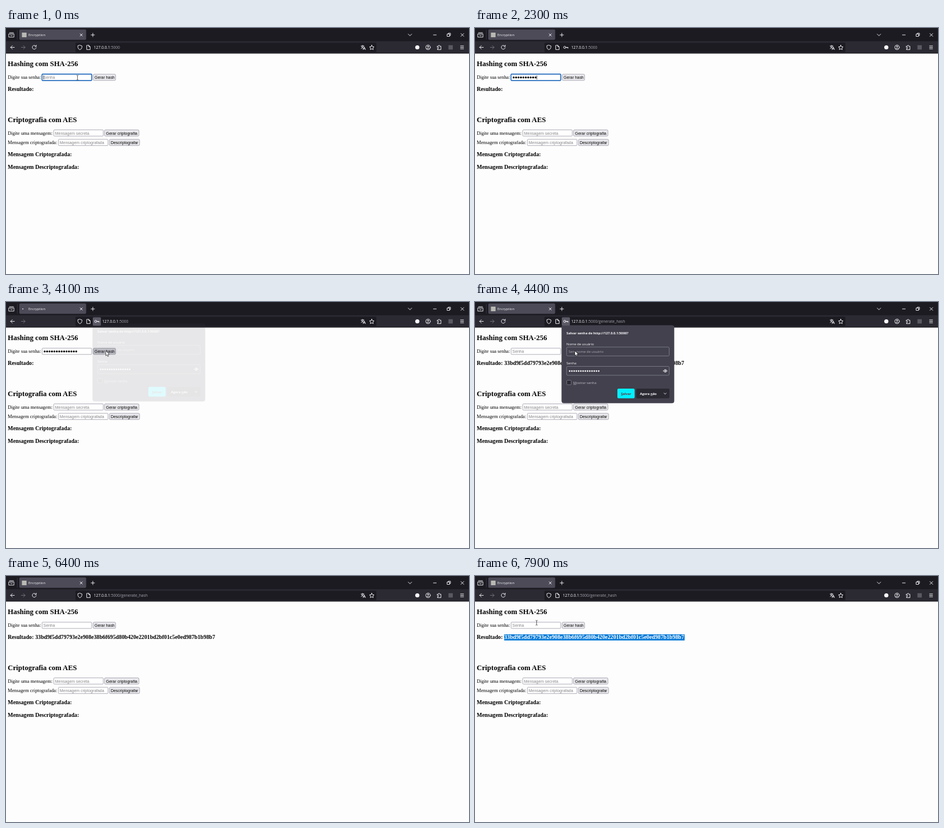
An HTML page that plays this animation: 800x426 px, repeating every 8 s.

```html
<!DOCTYPE html>
<html lang="pt">
<head>
<meta charset="utf-8">
<title>Encryption</title>
<style>
html, body { margin: 0; width: 100%; height: 100%; overflow: hidden; background: #fdfdfd; }
svg { display: block; width: 800px; height: 426px; }
text { white-space: pre; }
.page { font: 8.333px "Liberation Serif", serif; }
.page .h2 { font-size: 12.5px; font-weight: bold; }
.page .h3 { font-size: 9.75px; font-weight: bold; }
.page .form { font: 6.944px "Liberation Sans", sans-serif; }
.hint { fill: #858589; }
.field { fill: #fff; stroke: #8f8f9d; stroke-width: .7; }
.button { fill: #e9e9ed; stroke: #8f8f9d; stroke-width: .7; }
.ui { font: 5.9px "Open Sans", "Noto Sans", sans-serif; fill: #fbfbfe; }
.bold { font-weight: bold; font-size: 5.72px; }
.icon { fill: none; stroke: #fbfbfe; stroke-width: .9; stroke-linecap: round; stroke-linejoin: round; }
.dots { fill: none; stroke-linecap: round; }
.key { text-decoration: underline; }
</style>
</head>
<body>
<svg viewBox="0 0 800 426">
  <rect width="800" height="426" fill="#fdfdfd"/>

  <g class="page">
    <text class="h2" x="3" y="66">Hashing com SHA-256</text>
    <text x="3" y="88">Digite sua senha:</text>
    <text class="h3" x="3" y="109.4">Resultado:</text>
    <rect id="selection" x="50.4" y="101" width="311.8" height="10.6" fill="#0078d7"/>
    <text id="hash" class="h3" x="50.4" y="109.4">33bd9f5dd79793e2e908e38b6f695d80b420e2201bd2bf01c5e0ed987b1b98b7</text>
    <text class="h2" x="3" y="163">Criptografia com AES</text>
    <text x="3" y="184.6">Digite uma mensagem:</text>
    <text x="3" y="201">Mensagem criptografada:</text>
    <text class="h3" x="3" y="222.4">Mensagem Criptografada:</text>
    <text class="h3" x="3" y="243.6">Mensagem Descriptografada:</text>

    <g class="form">
      <rect class="field" x="62.4" y="80" width="85.6" height="10.8" rx="1"/>
      <rect id="focus" x="62.2" y="79.8" width="86" height="11.2" rx="1.2" fill="none" stroke="#1565c0" stroke-width="1.4"/>
      <text id="hint" class="hint" x="64.5" y="88">Senha</text>
      <path id="typed" class="dots" stroke="#000" stroke-width="3.3" stroke-dasharray="0 4.2"/>
      <path id="caret" stroke="#000" stroke-width=".7"/>
      <rect id="hashButton" class="button" x="150.6" y="80" width="38.8" height="10.8" rx="1.8"/>
      <text x="153" y="88">Gerar hash</text>
      <rect class="field" x="82.6" y="176.4" width="85.4" height="10.8" rx="1"/>
      <text class="hint" x="84.8" y="184.6">Mensagem secreta</text>
      <rect class="button" x="170.1" y="176.4" width="59.6" height="10.8" rx="1.8"/>
      <text x="172.8" y="184.6">Gerar criptografia</text>
      <rect class="field" x="90.6" y="192.8" width="85.6" height="10.8" rx="1"/>
      <text class="hint" x="92.8" y="201">Mensagem criptografada</text>
      <rect class="button" x="178.6" y="192.8" width="52.2" height="10.8" rx="1.8"/>
      <text x="181" y="201">Descriptografar</text>
    </g>
  </g>

  <g class="ui">
    <rect width="800" height="23" fill="#1c1b22"/>
    <rect y="23" width="800" height="21" fill="#2b2a33"/>
    <path d="M0 44H800" stroke="#0c0c0d" stroke-width=".6"/>
    <path d="M19.5 3V20" stroke="#42414d" stroke-width=".6"/>
    <rect x="23" y="2.5" width="115.5" height="18" rx="2" fill="#4c4b57"/>
    <rect id="favicon" x="27.5" y="8" width="8" height="8" fill="#b9b9b4"/>
    <circle id="loading" cy="12" r="1" fill="#d8d8de"/>
    <text x="38.8" y="14.1" font-size="5.85">Encryption</text>
    <rect x="120" y="25.5" width="520" height="16.5" rx="2" fill="#1c1b22"/>
    <rect id="keyBack" x="150" y="26.5" width="14" height="14.5" rx="1.5" fill="#5b5a66"/>

    <g class="icon">
      <path d="M6 8.2H13M5.2 10.2H13.8V15.8H5.2ZM7.7 12.4Q9.5 14.6 11.3 12.4"/>
      <path d="M128 10l4 4m0-4l-4 4M147 12h6M150 9v6"/>
      <path d="M695 10.5l3 3 3-3M738.5 12h5M762.5 10.5h4v4h-4zM764 10.5V9h4v4h-1.5M786 9.5l5 5m0-5l-5 5"/>
      <path d="M14.5 33.5H8M11 30.5l-3 3 3 3"/>
      <path d="M26.5 33.5H33M30 30.5l3 3-3 3" stroke="#77767f"/>
      <path id="reload" d="M51.6 31.4A3.4 3.4 0 1 0 52.2 34M52.3 29.7V32H50"/>
      <path d="M127.7 29.8L131.2 31V33.4Q131 36.2 127.7 37.7Q124.4 36.2 124.2 33.4V31Z"/>
      <path d="M139.8 30H143L145.4 32.4V37.4H139.8ZM143 30V32.4H145.4"/>
      <g id="keyIcon"><circle cx="155" cy="33.5" r="1.9"/><path d="M157 33.5H160.8V35M159 33.5V34.7"/></g>
      <path d="M613.5 31.2H618.5M616 30V31.2M617.6 31.2Q616.8 34 613.8 35.6M614.5 32.5Q615.6 34.4 617.2 35M617 37.5L619 32.8 621 37.5M617.8 36H620.3"/>
      <path d="M632 29.8L633.2 32.3 636 32.7 634 34.6 634.5 37.4 632 36.1 629.5 37.4 630 34.6 628 32.7 630.8 32.3Z"/>
      <circle cx="729.3" cy="33.5" r="4"/>
      <circle cx="729.3" cy="32.2" r="1.1"/>
      <path d="M727 36Q729.3 33.8 731.6 36"/>
      <path d="M745.5 31.5H747.3V30.5Q748.3 29.2 749.2 30.5V31.5H751.5V37.5H745.5V35.6Q748 35.6 748 34.5Q748 33.3 745.5 33.4Z"/>
      <path d="M785.3 31H790.7M785.3 33.5H790.7M785.3 36H790.7"/>
    </g>
    <circle cx="710.7" cy="33.5" r="3.6" fill="#fbfbfe"/>
    <rect x="764.5" y="29.8" width="7.5" height="7.5" fill="#5a5962"/>
    <text id="url" y="36.2" font-size="6.65">127.0.0.1<tspan fill="#a5a4ad">:5000<tspan id="route">/generate_hash</tspan></tspan></text>
  </g>

  <g id="popup" class="ui">
    <rect x="149.8" y="40.8" width="194.2" height="134.2" rx="3.5" fill="#42414d" stroke="#52525e" stroke-width=".6"/>
    <text class="bold" x="158" y="56">Salvar senha de http://127.0.0.1:5000?</text>
    <text x="158" y="74.7">Nome de usuário</text>
    <text x="158" y="108.2">Senha</text>
    <g fill="#42414d" stroke="#8f8f9d" stroke-width=".7">
      <rect x="158.3" y="78" width="177.2" height="15.4" rx="2"/>
      <rect x="158.3" y="111.5" width="177.2" height="15.4" rx="2"/>
      <rect x="158.6" y="135.6" width="7.6" height="7.6" rx="1" fill="#2b2a33"/>
    </g>
    <text x="161.8" y="88" fill="#a9a8b1">Sem nome de usuário</text>
    <path class="dots" d="M163.6 119.6h50.2" stroke="#fbfbfe" stroke-width="2.8" stroke-dasharray="0 3.86"/>
    <g class="icon" stroke-width=".7"><path d="M325.5 119.3Q328.8 114.6 332.1 119.3Q328.8 124 325.5 119.3Z"/><circle cx="328.8" cy="119.3" r="1.1"/></g>
    <text x="169.8" y="141.6" fill="#c0bfc8"><tspan class="key">M</tspan>ostrar senha</text>
    <rect x="246" y="150" width="29.8" height="16.8" rx="2" fill="#00f0ff"/>
    <text class="bold" x="252.2" y="160.6" fill="#6b3038"><tspan class="key">S</tspan>alvar</text>
    <rect x="278.6" y="150" width="57.4" height="16.8" rx="2" fill="#2b2a33"/>
    <path id="notNow" d="M280.6 150H321V166.8H280.6Q278.6 166.8 278.6 164.8V152Q278.6 150 280.6 150Z"/>
    <text class="bold" x="285" y="160.6">Agora <tspan class="key">n</tspan>ão</text>
    <path class="icon" d="M326.6 157.8l1.9 1.8 1.9-1.8"/>
  </g>

  <path id="arrow" d="M0 0V8.6L2 6.8 3.3 9.8 4.7 9.2 3.4 6.3H6.1Z" fill="#fff" stroke="#000" stroke-width=".6"/>
  <path id="beam" d="M-1.8-4H-.5L0-3.6.5-4H1.8M0-3.6V3.6M-1.8 4H-.5L0 3.6.5 4H1.8" fill="none" stroke="#222" stroke-width=".7"/>
</svg>
<script>
const LOOP = 8000, TYPE = 1300, CLICK = 3900, POPUP = 4050, LOADED = 4200, DISMISS = 5650, SELECT = 7400;
// Mouse waypoints: time, x, y
const route = [
  [0, 123.5, 86], [3000, 123.5, 86], [3300, 142, 74], [3600, 172.5, 84.5], [4400, 172.5, 84.5],
  [5200, 308.5, 160.5], [DISMISS, 308.5, 160.5], [6200, 359, 106], [6450, 359, 106],
  [7000, 111.5, 98.8], [7250, 113, 106], [7500, 113, 106], [7850, 106.5, 81], [LOOP, 106.5, 81]
];
const el = id => document.getElementById(id);
const show = (id, on) => el(id).style.display = on ? "" : "none";
const set = (id, name, value) => el(id).setAttribute(name, value);
const clamp = v => Math.max(0, Math.min(1, v));
const ease = v => v * v * (3 - 2 * v);
const within = (t, a, b) => t >= a && t < b;

function mouseAt(t) {
  const i = route.findIndex(p => p[0] > t), [t0, x0, y0] = route[i - 1], [t1, x1, y1] = route[i];
  const k = ease((t - t0) / (t1 - t0));
  return [x0 + (x1 - x0) * k, y0 + (y1 - y0) * k];
}

function drawForm(t) {
  const count = t < TYPE || t >= LOADED ? 0 : Math.min(14, 1 + Math.floor((t - TYPE) / 110));
  const focused = t < CLICK;
  const caretX = count ? 64.9 + 4.2 * count : 65;
  show("typed", count);
  set("typed", "d", `M66.8 85.7h${Math.max(.01, (count - 1) * 4.2 + .1)}`);
  show("hint", !count);
  show("focus", focused);
  set("caret", "d", `M${caretX} 82v7.2`);
  show("caret", focused && (within(t, TYPE, 2850) || t % 1000 < 500));
  show("hash", t >= LOADED);
  show("selection", t >= SELECT);
  el("hash").style.fill = t >= SELECT ? "#fff" : "#000";
}

function drawBrowser(t) {
  const hasKey = within(t, TYPE, DISMISS + 50), loading = within(t, CLICK + 50, LOADED);
  show("keyIcon", hasKey);
  show("keyBack", within(t, POPUP, DISMISS + 50));
  set("url", "x", hasKey ? 166.3 : 151.8);
  show("route", t >= LOADED);
  show("favicon", !loading);
  show("reload", !loading);
  show("loading", loading);
  set("loading", "cx", 31.5 + 3 * Math.cos((t - 4100) / 160 + Math.PI * .8));
}

function drawPopup(t) {
  const shown = ease(clamp((t - POPUP) / 250)) * (1 - clamp((t - DISMISS) / 100));
  show("popup", shown);
  set("popup", "opacity", shown);
  set("popup", "transform", `translate(0 ${-3.3 * (1 - shown)})`);
}

function drawMouse(t) {
  const [x, y] = mouseAt(t), popup = within(t, POPUP, DISMISS + 100);
  const overInput = within(x, 62, 148.5) && within(y, 80, 91);
  const overResult = !popup && within(x, 3, 362) && within(y, 101, 112);
  const hidden = within(t, TYPE, 3000) || within(t, 6200, 6460);
  const beam = overInput || overResult;
  show("beam", beam && !hidden);
  show("arrow", !beam && !hidden);
  for (const id of ["beam", "arrow"]) set(id, "transform", `translate(${x} ${y})`);
  const overButton = within(x, 150.5, 189.5) && within(y, 80, 91) && t < 4500;
  el("hashButton").style.fill = !overButton ? "" : within(t, CLICK - 80, CLICK + 20) ? "#b1b1b9" : "#cacad1";
  set("notNow", "fill", x > 278.6 && y > 150 ? "#7c7b85" : "#2b2a33");
}

function frame(now) {
  const t = now % LOOP;
  drawForm(t);
  drawBrowser(t);
  drawPopup(t);
  drawMouse(t);
  requestAnimationFrame(frame);
}
requestAnimationFrame(frame);
</script>
</body>
</html>
```
